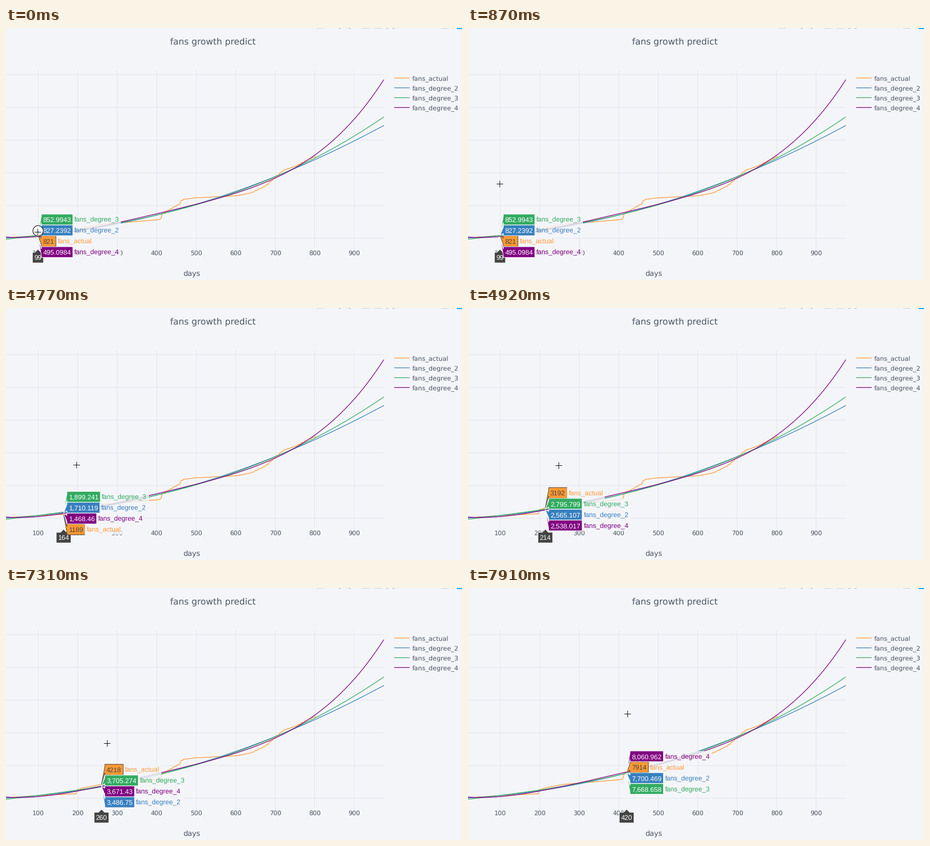
Recreate the animation shown at these times as a matplotlib script. Size 881 by 487 pixels, loop 8000 ms.

```python
import matplotlib.pyplot as plt
import numpy as np
from matplotlib.animation import FuncAnimation
from matplotlib.patches import Circle, Polygon, Rectangle

plt.rcParams["text.hinting"] = "none"

W, H = 881, 487
LOOP, STEP = 8000, 40
PAPER, GRID, INK, DARK = "#F4F5F9", "#E1E5ED", "#4D5663", "#444444"
ORANGE, BLUE, GREEN, PURPLE = "#FF9933", "#3780BF", "#32AB60", "#800080"
PLOT_RIGHT, PLOT_TOP, PLOT_BOTTOM = 730, 82, 427
FIRST_DAY, LAST_DAY = 18, 975.4

# Turning points of the counted fans (day, thousands).
TURNS = np.array([
    (18, 0.15), (99, 0.821), (195, 1.365), (198, 2.5), (214, 3.192),
    (260, 4.218), (409, 5.74), (412, 7.3), (420, 7.914), (458, 10.49),
    (465, 11.83), (493, 12.3), (605, 13.02), (640, 13.89), (676, 16.02),
    (721, 20.77), (750, 21.96), (803, 25.12)])

# A curve of degree n passes through its values on the first n + 1 days.
KNOTS = [99, 420, 214, 260, 102]


def curve_through(*values):
    degree = len(values) - 1
    return np.polynomial.Polynomial.fit(KNOTS[:degree + 1], values, degree)


FITS = [
    ("fans_degree_2", BLUE, curve_through(827.2392, 7700.469, 2565.107)),
    ("fans_degree_3", GREEN,
     curve_through(852.9943, 7668.658, 2795.799, 3705.274)),
    ("fans_degree_4", PURPLE,
     curve_through(495.0984, 8060.962, 2538.017, 3671.43, 526.2171)),
]

# start ms, end ms, steps, pointer from, pointer to, hovered days
GESTURES = [
    (0, 870, 6, (61, 394), (61, 301), (99, 99)),
    (4470, 5210, 5, (69, 301), (184, 305), (102, 260)),
    (7310, 7910, 4, (195, 300), (308, 243), (260, 420)),
]
POINTER_PACE, HOVER_PACE = 1.39, 1.072  # the labels lag behind the pointer


def actual(day):
    return 1000 * np.interp(day, TURNS[:, 0], TURNS[:, 1])


def smooth(u):
    u = min(u, 1)
    return u * u * (3 - 2 * u)


def mix(a, b, u):
    return a + (b - a) * u


def px(day):
    return 62.5 + (day - 100) * 0.7625


def py(fans):
    return 406.3 - fans / 158.2


# At 72 dpi one point is one pixel.
fig = plt.figure(figsize=((W + 1e-6) / 72, (H + 1e-6) / 72), dpi=72,
                 facecolor=PAPER)
ax = fig.add_axes([0, 0, 1, 1])
ax.set_xlim(0, W)
ax.set_ylim(H, 0)
ax.axis("off")


def text(x, y, s, size, color=INK, font="DejaVu Sans", ha="left", z=3):
    return ax.text(x, y, s, fontsize=size, color=color, family=font, ha=ha,
                   va="baseline", zorder=z)


def line(xs, ys, color, width=1.3, z=2):
    return ax.plot(xs, ys, color=color, lw=width, zorder=z, snap=False,
                   solid_capstyle="butt")[0]


def rect(x, y, w, h, color, alpha=1, z=3):
    return ax.add_patch(Rectangle((x, y), w, h, fc=color, ec="none",
                                  alpha=alpha, zorder=z))


def text_width(label):
    return label.get_window_extent().transformed(
        ax.transData.inverted()).width


def draw_chart():
    for day in range(100, 1000, 100):
        line([px(day)] * 2, [PLOT_TOP, PLOT_BOTTOM], GRID, 1, 1)
        text(px(day), 440, str(day), 12, ha="center")
    for fans in range(0, 60000, 10000):
        line([0, PLOT_RIGHT], [py(fans)] * 2, GRID, 1, 1)

    # New fans come in small bursts, so the counted line climbs in stairs.
    days = np.arange(FIRST_DAY, TURNS[-1, 0] + 1)
    bursts = days + 1.4 * np.sin(2 * np.pi * days / 9)
    line(px(days), py(actual(bursts)), ORANGE)
    days = np.linspace(FIRST_DAY, LAST_DAY, 60)
    for _, color, curve in FITS:
        line(px(days), py(curve(days)), color)

    names = [("fans_actual", ORANGE)] + [f[:2] for f in FITS]
    for row, (name, color) in enumerate(names):
        y = 96.6 + 19 * row
        line([750, 780], [y, y], color)
        text(785, y + 4.4, name, 12.4)

    text(400, 32, "fans growth predict", 17, ha="center")
    text(359, 479, "days", 14, ha="center")

    # lower edge of the toolbar
    for x in (600, 688, 712, 841):
        rect(x, 0, 14, 1, "#CDD0D6")
    for x in (643, 662, 735, 747):
        rect(x, 0, 4, 1.5, "#9A9FA8")
    rect(871, 0, 10, 2, "#119DFF")


def draw_day_tag(day):
    x, top = px(day), PLOT_BOTTOM + 0.5
    label = text(x, top + 20.5, str(day), 13, "white", "Liberation Sans",
                 "center", 11)
    half = text_width(label) / 2 + 3.4
    outline = [(0, 0), (6, 6), (half, 6), (half, 26.5), (-half, 26.5),
               (-half, 6), (-6, 6)]
    tag = Polygon([(x + dx, top + dy) for dx, dy in outline], fc=DARK,
                  ec="white", lw=1, zorder=10)
    return [label, ax.add_patch(tag)]


def draw_value_tag(day, fans, value, name, color, cy, z):
    x, left = px(day), px(day) + 6.5
    ink = DARK if color == ORANGE else "white"
    number = text(left + 3, cy + 4.7, value, 13, ink, "Liberation Sans",
                  z=z + 1)
    right = left + text_width(number) + 6.6
    outline = [(x, py(fans)), (left, cy + 6), (left, cy + 10.3),
               (right, cy + 10.3), (right, cy - 10.3), (left, cy - 10.3),
               (left, cy - 6)]
    tag = ax.add_patch(Polygon(outline, fc=color, ec=ink, lw=1, zorder=z))
    label = text(right + 3, cy + 4.7, name, 13, color, "Liberation Sans",
                 z=z + 1)
    veil = rect(right, cy - 10.5, text_width(label) + 6.5, 21, PAPER, 0.8, z)
    return [number, tag, label, veil]


def draw_hover(day):
    count = round(actual(day))
    tags = [(count, str(count), "fans_actual", ORANGE)]
    for name, color, curve in FITS:
        tags.append((curve(day), f"{curve(day):,.7g}", name, color))
    middle = np.mean([py(tag[0]) for tag in tags])
    ranked = sorted(tags, key=lambda tag: -tag[0])

    parts = draw_day_tag(day)
    for order, tag in enumerate(tags):
        cy = middle + 21 * (ranked.index(tag) - 1.5)
        parts += draw_value_tag(day, *tag, cy, 12 + 2 * order)
    return parts


def draw_pointer(x, y, pressed):
    x, y = int(x) + 0.5, int(y) + 0.5
    parts = []
    if pressed:
        ring = Circle((x + 0.5, y - 2.5), 10, fc="white", ec="black", lw=1.1,
                      zorder=30)
        parts.append(ax.add_patch(ring))
    for color, width, reach in [("white", 3, 7), ("black", 1, 6.5)]:
        parts.append(line([x - reach, x + reach], [y, y], color, width, 31))
        parts.append(line([x, x], [y - reach, y + reach], color, width, 31))
    return parts


def pose(now):
    """Pointer x, y, hovered day and button state, held between steps."""
    start, end, steps, a, b, days = [g for g in GESTURES if g[0] <= now][-1]
    u = min(int((now - start) / (end - start) * steps), steps) / steps
    lead = smooth(u * POINTER_PACE)
    day = round(mix(*days, smooth(u * HOVER_PACE)))
    return mix(a[0], b[0], lead), mix(a[1], b[1], lead), day, start == u == 0


draw_chart()
shown = {"pose": None, "parts": []}


def clear():
    for part in shown["parts"]:
        part.remove()
    shown.update(pose=None, parts=[])
    return []


def update(frame):
    # lean towards the end of each step so changes are not late
    current = pose(frame * STEP + 30)
    if current != shown["pose"]:
        clear()
        x, y, day, pressed = current
        parts = draw_hover(day) + draw_pointer(x, y, pressed)
        shown.update(pose=current, parts=parts)
    return shown["parts"]


anim = FuncAnimation(fig, update, frames=LOOP // STEP, init_func=clear,
                     interval=STEP, repeat=True, repeat_delay=0, blit=False)
plt.show()
```
